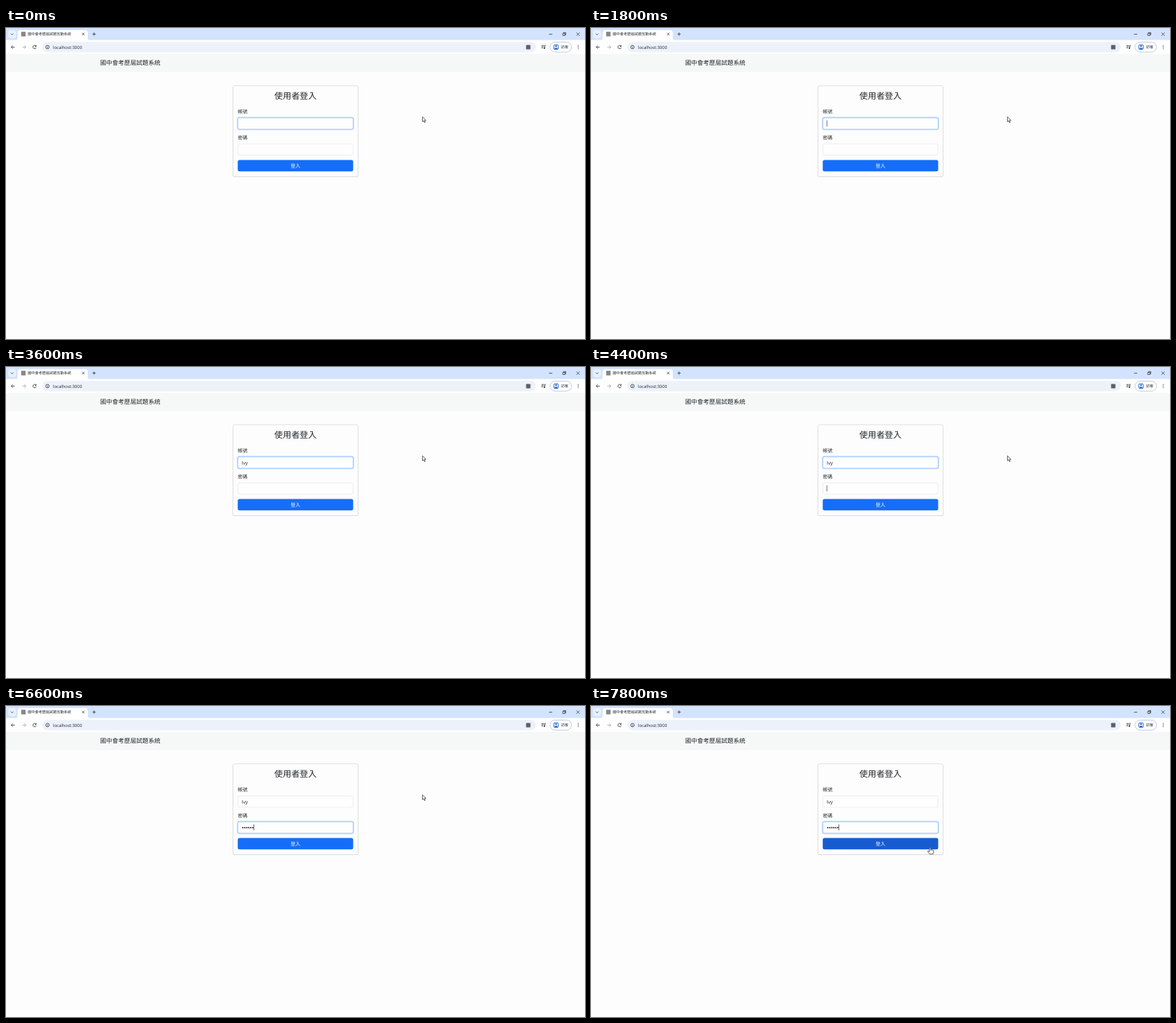
Write an HTML page that moves like this. It is 800 px wide and 430 px high and loops after 8000 ms.

```html
<!DOCTYPE html>
<html lang="zh-Hant">
<head>
<meta charset="utf-8">
<title>國中會考歷屆試題系統</title>
<style>
html, body { margin: 0; width: 800px; height: 430px; overflow: hidden; background: #fdfdfd; }
svg { display: block; }
text { font-family: "Open Sans", "Noto Sans CJK TC", "Noto Sans CJK", sans-serif; text-rendering: geometricPrecision; fill: #212529; }
.cjk { font-family: "Noto Sans CJK TC", "Noto Sans CJK", sans-serif; }
.mid { text-anchor: middle; }
.icon { fill: none; stroke: #33363a; stroke-width: .8; }
.field { fill: #fefefe; stroke: #dee2e6; stroke-width: .6; }
.glow { fill: none; stroke: #c2dbfe; stroke-width: 1.5; }
.focus .field { stroke: #86b7fe; }
.field-box:not(.focus) .glow { display: none; }
.caret { stroke: #111; stroke-width: .6; }
</style>
</head>
<body>
<svg width="800" height="430" viewBox="0 0 800 430">
  <rect width="800" height="430" fill="#fdfdfd"/>

  <!-- tab strip -->
  <rect width="800" height="17" fill="#d3e3fd"/>
  <rect x="3" y="3" width="11" height="11" rx="4" fill="#e8f0fe"/>
  <path class="icon" d="M6.6 7.7l1.8 1.8 1.8-1.8"/>
  <path d="M13 17q3 0 3-3V7q0-4 4-4h89q4 0 4 4v7q0 3 3 3z" fill="#fff"/>
  <rect x="21" y="5.2" width="6" height="6.4" fill="#898786"/>
  <text class="cjk" x="30" y="10.3" font-size="5">國中會考歷屆試題互動系統</text>
  <path class="icon" d="M105 6.7l3.4 3.4m0-3.4l-3.4 3.4M119.4 8.4h4.6m-2.3-2.3v4.6"/>
  <path class="icon" d="M750.3 8.6h4.4M769.3 7.4h3v3h-3zM770.3 7.2v-.9h3.1v3.1h-.9M788.3 6.4l4.2 4.2m0-4.2l-4.2 4.2"/>

  <!-- toolbar -->
  <rect y="16.6" width="800" height="19.4" fill="#fefefe"/>
  <rect x="50" y="19.2" width="682" height="14.4" rx="7.2" fill="#edf1fa"/>
  <path class="icon" d="M12 26.4H7.2m2.3-2.4l-2.4 2.4 2.4 2.4"/>
  <path class="icon" style="stroke:#a5a8ac" d="M22.6 26.4h4.8m-2.3-2.4l2.4 2.4-2.4 2.4"/>
  <path class="icon" d="M41.2 24.9a2.3 2.3 0 1 0 .5 2.1M41.8 23.7v1.8H40"/>
  <circle class="icon" cx="57.3" cy="26.4" r="2.4" stroke-width=".6"/>
  <path class="icon" d="M57.3 26v1.7m0-2.9v.5"/>
  <text x="65" y="28.6" font-size="5.95" fill="#303338">localhost:3000</text>
  <rect x="718.6" y="23.6" width="6" height="6" rx=".6" fill="#5c6066"/>
  <path class="icon" d="M739.8 24.2h3.6m-3.6 1.7h3.6m-3.6 1.7h2M745.8 24h-1.3v4"/>
  <circle cx="743.8" cy="28" r="1" fill="#33363a"/>
  <rect x="751.6" y="19.5" width="29.8" height="13.8" rx="6.9" fill="#fefefe" stroke="#a9b9d8" stroke-width=".7"/>
  <rect x="757" y="23.4" width="6" height="6" rx=".8" fill="#fff" stroke="#1a5fcb" stroke-width="1"/>
  <circle cx="760" cy="25.4" r="1.1" fill="#1a5fcb"/>
  <path d="M757.6 29q2.4-3.4 4.8 0z" fill="#1a5fcb"/>
  <text class="cjk" x="767" y="28.3" font-size="5">訪客</text>
  <g fill="#33363a"><circle cx="790.7" cy="24.2" r=".6"/><circle cx="790.7" cy="26.4" r=".6"/><circle cx="790.7" cy="28.6" r=".6"/></g>

  <!-- page -->
  <rect y="36" width="800" height="25" fill="#f6f8f8"/>
  <text class="cjk" x="130" y="51.3" font-size="8.33">國中會考歷屆試題系統</text>
  <rect x="313.3" y="80" width="173.6" height="126.2" rx="2.8" fill="#e9e9ea"/>
  <rect x="313.6" y="79.8" width="172.9" height="125.6" rx="2.5" fill="#fdfdfd" stroke="#d5d6d8" stroke-width=".7"/>
  <text class="cjk mid" x="400" y="98.4" font-size="11.67" font-weight="500">使用者登入</text>
  <text class="cjk" x="320.3" y="118.4" font-size="6.67">帳號</text>
  <text class="cjk" x="320.3" y="154.3" font-size="6.67">密碼</text>
  <g id="user" class="field-box">
    <rect class="glow" x="319.7" y="123.6" width="160.6" height="17" rx="3"/>
    <rect class="field" x="320.4" y="124.3" width="159.2" height="15.6" rx="2.5"/>
  </g>
  <g id="pass" class="field-box">
    <rect class="glow" x="319.7" y="159.5" width="160.6" height="17" rx="3"/>
    <rect class="field" x="320.4" y="160.2" width="159.2" height="15.6" rx="2.5"/>
  </g>
  <text id="name" x="325.6" y="134.5" font-size="6.67"></text>
  <g id="dots" fill="#1b1d20"></g>
  <line id="caret" class="caret" y2="8.4"/>
  <rect id="button" x="320.2" y="182.4" width="159.5" height="15.9" rx="2.5"/>
  <text class="cjk mid" x="400" y="192.9" font-size="6.67" style="fill:#fff">登入</text>

  <!-- pointers, hot spot at 0,0 -->
  <path id="arrow" d="M0 0v6.8l1.6-1.4 1.1 2.5 1.2-.5-1.1-2.5h2.1z" fill="#fff" stroke="#222" stroke-width=".7"/>
  <path id="hand" d="M-.8 .6q.8-1.2 1.6 0v3q.7-.7 1.4 0 .7-.6 1.3.2 1.1-.4 1.2.7v2.3l-.9 2.4H-.6L-3.3 5.6q.1-1.4 1.4-.6l1.1.9z" fill="#fff" stroke="#222" stroke-width=".7" stroke-linejoin="round"/>
</svg>
<script>
const LOOP = 8000, STEP = 200, BLINK = 530;
const USER = "Ivy";
const KEY_TIMES = [2200, 2400, 3000];
const TAB_TIME = 4400, PASS_TIME = 6200, PASS_LENGTH = 6;
const START = { x: 575.4, y: 122.8 }, END = { x: 468.6, y: 195.6 };
const el = id => document.getElementById(id);
const show = (node, on) => node.setAttribute("visibility", on ? "visible" : "hidden");

const dots = Array.from({ length: PASS_LENGTH }, (_, i) => {
  const dot = document.createElementNS("http://www.w3.org/2000/svg", "circle");
  dot.setAttribute("cx", 327.2 + i * 2.75);
  dot.setAttribute("cy", 168.2);
  dot.setAttribute("r", 0.95);
  el("dots").append(dot);
  return dot;
});

function caretOn(t, typed, count) {
  let since = -780;
  if (typed) since = KEY_TIMES[typed - 1];
  if (t >= TAB_TIME) since = TAB_TIME;
  if (count) since = Math.min(t, PASS_TIME + 2 * STEP);
  return Math.floor((t - since) / BLINK) % 2 === 0;
}

function drawPointer(t) {
  const u = Math.min(1, Math.max(0, (t - 6900) / 900));
  const s = u * u * (3 - 2 * u);
  const x = START.x + (END.x - START.x) * s;
  const y = START.y + (END.y - START.y) * s;
  const hover = x > 320 && x < 480 && y > 182 && y < 198;
  for (const id of ["arrow", "hand"]) el(id).setAttribute("transform", `translate(${x} ${y})`);
  show(el("arrow"), !hover);
  show(el("hand"), hover);
  el("button").setAttribute("fill", hover ? "#175bd1" : "#156ef8");
}

function draw(t) {
  const typed = KEY_TIMES.filter(k => t >= k).length;
  const count = t < PASS_TIME ? 0 : Math.min(PASS_LENGTH, 2 + 2 * Math.floor((t - PASS_TIME) / STEP));
  const inPass = t >= TAB_TIME;
  const lit = t > TAB_TIME;
  el("name").textContent = USER.slice(0, typed);
  dots.forEach((dot, i) => show(dot, i < count));
  el("user").classList.toggle("focus", !lit);
  el("pass").classList.toggle("focus", lit);

  const x = inPass ? 326 + count * 2.75 : 326 + (typed ? el("name").getComputedTextLength() : 0);
  el("caret").setAttribute("transform", `translate(${x} ${inPass ? 163.6 : 127.8})`);
  show(el("caret"), caretOn(t, typed, count));
  drawPointer(t);
}

const begin = performance.now();
function tick() {
  const t = (performance.now() - begin) % LOOP;
  draw(Math.floor(t / STEP) * STEP);
  requestAnimationFrame(tick);
}
tick();
</script>
</body>
</html>
```
